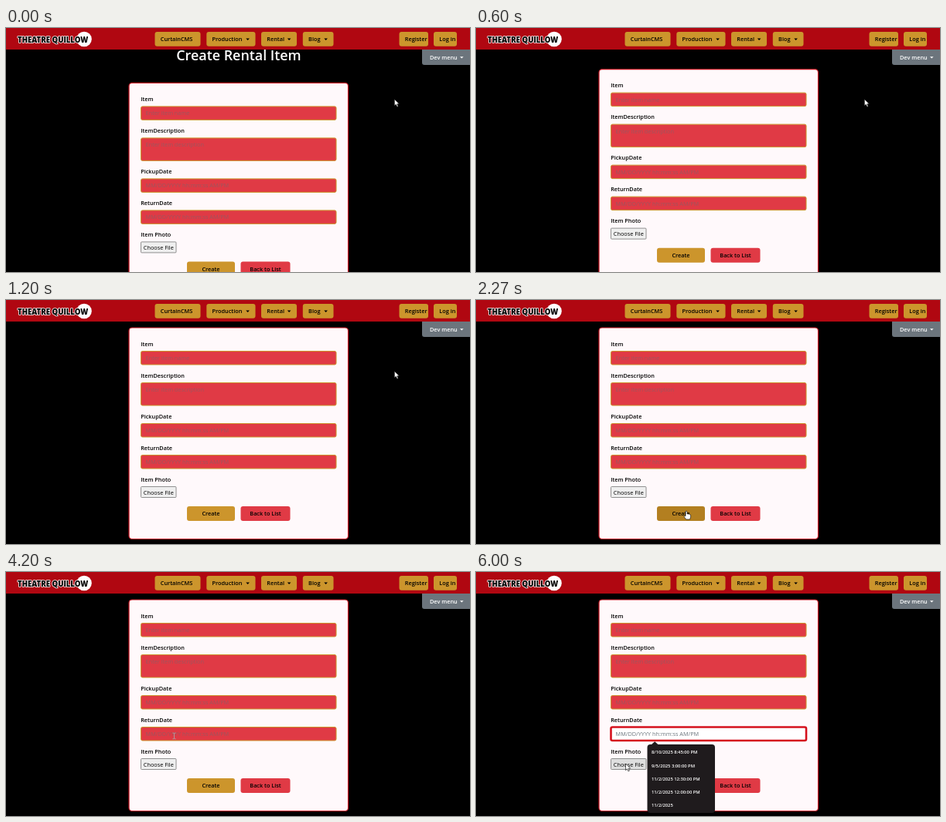
Recreate the animation shown at these times as an HTML page. Size 600 by 317 pixels, loop 6.07 s.

```html
<!DOCTYPE html>
<html lang="en">
<head>
<meta charset="utf-8">
<title>Create Rental Item</title>
<style>
html, body { margin: 0; width: 100%; height: 100%; overflow: hidden; background: #000; }
svg { display: block; width: 100vw; height: 100vh; }
text { font-family: "Open Sans", "Noto Sans", sans-serif; font-size: 7.3px; white-space: pre; }
</style>
</head>
<body>
<svg id="stage" viewBox="0 0 600 317"></svg>
<script>
const LOOP = 6070, SCROLL = 35.4, CLICK = 4350;
const GOLD = '#cc952c', RED = '#e03a45', HINT = '#9c565e';
const stage = document.getElementById('stage');

function add(parent, tag, attrs, content) {
  const el = document.createElementNS('http://www.w3.org/2000/svg', tag);
  set(el, attrs);
  if (content) el.textContent = content;
  parent.appendChild(el);
  return el;
}
function set(el, attrs) {
  for (const k in attrs) el.setAttribute(k, attrs[k]);
}
const group = (parent, attrs = {}) => add(parent, 'g', attrs);
const box = (parent, x, y, width, height, rx, fill, more) =>
  add(parent, 'rect', { x, y, width, height, rx, fill, ...more });
const label = (parent, x, y, str, more) =>
  add(parent, 'text', { x, y, 'font-weight': 600, ...more }, str);
const caretMark = (parent, x, y, fill) =>
  add(parent, 'path', { d: `M${x} ${y}h4.6l-2.3 2.4z`, fill });
const show = (el, on) => el.setAttribute('visibility', on ? 'visible' : 'hidden');

// Scrolling page
const page = group(stage);
label(page, 301, 6.2, 'Create Rental Item',
  { 'font-size': 18, 'text-anchor': 'middle', fill: '#fff', style: 'font-size:17.9px' });
box(page, 159, 36, 283.5, 274.5, 4, '#fff9fb', { stroke: '#c4121e', 'stroke-width': 1.2 });

function field(name, y, height, hint) {
  label(page, 174.2, y - 6.4, name);
  const frame = box(page, 174.5, y + .5, 252.5, height - 1, 2, RED, { stroke: GOLD });
  const text = label(page, 180.6, y + 11.9, hint, { 'font-weight': 400, fill: HINT });
  return { frame, text };
}
const DATE_HINT = 'MM/DD/YYYY hh:mm:ss AM/PM';
field('Item', 66, 18.5, 'Enter item name');
field('ItemDescription', 107, 30.5, 'Enter item description');
field('PickupDate', 160, 18.5, DATE_HINT);
const back = field('ReturnDate', 201, 18.5, DATE_HINT);
const textCaret = box(page, 180.4, 205.5, .7, 9.5, 0, '#222');

label(page, 174.2, 235.8, 'Item Photo');
const file = box(page, 174.5, 242.5, 45.5, 14, 1, '#efefef', { stroke: '#777', 'stroke-width': .8 });
label(page, 197.3, 252.6, 'Choose File', { 'font-weight': 400, 'text-anchor': 'middle' });

function button(x, width, name, fill) {
  const shape = box(page, x, 268, width, 19, 3, fill);
  const text = label(page, x + width / 2, 280.4, name, { 'text-anchor': 'middle' });
  return { shape, text };
}
const create = button(234, 62, 'Create', GOLD);
const list = button(303.5, 64, 'Back to List', RED);

// Suggestions of the date field
const popup = group(page);
add(popup, 'path', { d: 'M226.5 224.5l4.7-4.3 4.7 4.3z', fill: '#1f1b1d' });
box(popup, 221.5, 224, 87.5, 89, 4, '#1f1b1d');
['8/10/2025 8:45:00 PM', '9/5/2025 3:00:00 PM', '11/2/2025 12:30:00 PM', '11/2/2025 12:00:00 PM', '11/2/2025']
  .forEach((s, i) => label(popup, 227, 236.4 + i * 17.2, s, { fill: '#fff', style: 'font-size:5.8px' }));

// Fixed bar
box(stage, 0, 0, 600, 28, 0, '#b00711');
add(stage, 'circle', { cx: 101, cy: 14.5, r: 9.8, fill: '#fff' });
label(stage, 15, 19.3, 'THEATRE QUILLOW', {
  'font-weight': 800, fill: '#000', stroke: '#fff', 'stroke-width': 1.6,
  'stroke-linejoin': 'round', 'paint-order': 'stroke', style: 'font-size:9.6px'
});
function navItem(x, width, name, menu) {
  box(stage, x, 5, width, 18.8, 3, GOLD);
  label(stage, x + 7.3, 17.1, name);
  if (menu) caretMark(stage, x + width - 12.2, 13.6, '#000');
}
navItem(192.5, 59, 'CurtainCMS');
navItem(259.3, 63.2, 'Production', true);
navItem(330, 46, 'Rental', true);
navItem(383.8, 39.7, 'Blog', true);
navItem(508.5, 37.5, 'Register');
navItem(553, 30, 'Log in');
add(stage, 'path', { d: 'M538 28h62v20h-59q-3 0-3-3z', fill: '#6c757d' });
label(stage, 548, 41.1, 'Dev menu', { fill: '#fff' });
caretMark(stage, 587, 37.2, '#fff');

// Pointers, each with its hot spot at 0,0
const pointer = group(stage);
const arrow = add(pointer, 'path', {
  d: 'M0 0V8.6L2 6.8 3.4 9.9 4.9 9.2 3.5 6.2H6.2Z', fill: '#fff', stroke: '#000', 'stroke-width': .6
});
const hand = add(pointer, 'path', {
  d: 'M-1 .8Q0-.6 1 .8V4Q2 3.3 2.8 4.3 3.8 3.7 4.4 4.7 5.6 4.4 5.6 5.8V8L4.6 11H-.4L-3 7.3Q-3.2 5.8-1 6.8Z',
  fill: '#fff', stroke: '#000', 'stroke-width': .6
});
const beam = add(pointer, 'path', { d: 'M-2-3.8H-.5L0-3.3.5-3.8H2M0-3.3V3.3M-2 3.8H-.5L0 3.3.5 3.8H2', fill: 'none' });

const smooth = (t, a, b) => {
  const u = Math.min(1, Math.max(0, (t - a) / (b - a)));
  return u * u * (3 - 2 * u);
};
const mix = (a, b, u) => a + (b - a) * u;

// Pointer stops: arrive at x,y between two times
const moves = [
  [1400, 2150, 272, 274],
  [2650, 2950, 318, 275],
  [3450, 4100, 217.5, 213],
  [4220, 4400, 219.5, 210.5],
  [5250, 5850, 193.5, 249]
];
function pointerAt(t) {
  let x = 502.3, y = 92.5;
  for (const [a, b, tx, ty] of moves) {
    const u = smooth(t, a, b);
    x = mix(x, tx, u);
    y = mix(y, ty, u);
  }
  return [x, y];
}

function draw(t) {
  page.setAttribute('transform', `translate(0 ${SCROLL * (1 - smooth(t, 200, 1000))})`);

  const [x, y] = pointerAt(t);
  const within = (l, top, r, bottom) => t > 1400 && x > l && x < r && y > top && y < bottom;
  const focus = t >= CLICK;
  const overMenu = focus && within(221.5, 224, 309, 313);
  const overCreate = within(234, 268, 296, 287) && !overMenu;
  const overList = within(303.5, 268, 367.5, 287);
  const overText = !overMenu && [[66, 84], [107, 138], [160, 178], [201, 220]]
    .some(([a, b]) => within(174, a, 428, b));

  set(create.shape, { fill: overCreate ? '#b37f20' : overList ? '#c09033' : GOLD });
  set(list.shape, { fill: overList ? '#c4141f' : RED });
  set(list.text, { fill: overList ? '#fff' : '#000' });
  set(file, { fill: within(174, 242, 220, 257) ? '#dedede' : '#efefef' });

  set(back.frame, focus
    ? { fill: '#fff', stroke: '#d5111d', 'stroke-width': 2.6 }
    : { fill: RED, stroke: GOLD, 'stroke-width': 1 });
  set(back.text, { fill: focus ? '#6c757d' : HINT });
  show(popup, focus);
  show(textCaret, focus && (t - CLICK) % 1000 < 500);

  set(pointer, { transform: `translate(${x} ${y})` });
  set(beam, { stroke: focus ? '#000' : '#9fb0b0', 'stroke-width': focus ? 1 : .8 });
  show(hand, overCreate || overList);
  show(beam, overText);
  show(arrow, !overCreate && !overList && !overText);
}

function tick() {
  draw(performance.now() % LOOP);
  requestAnimationFrame(tick);
}
tick();
</script>
</body>
</html>
```
